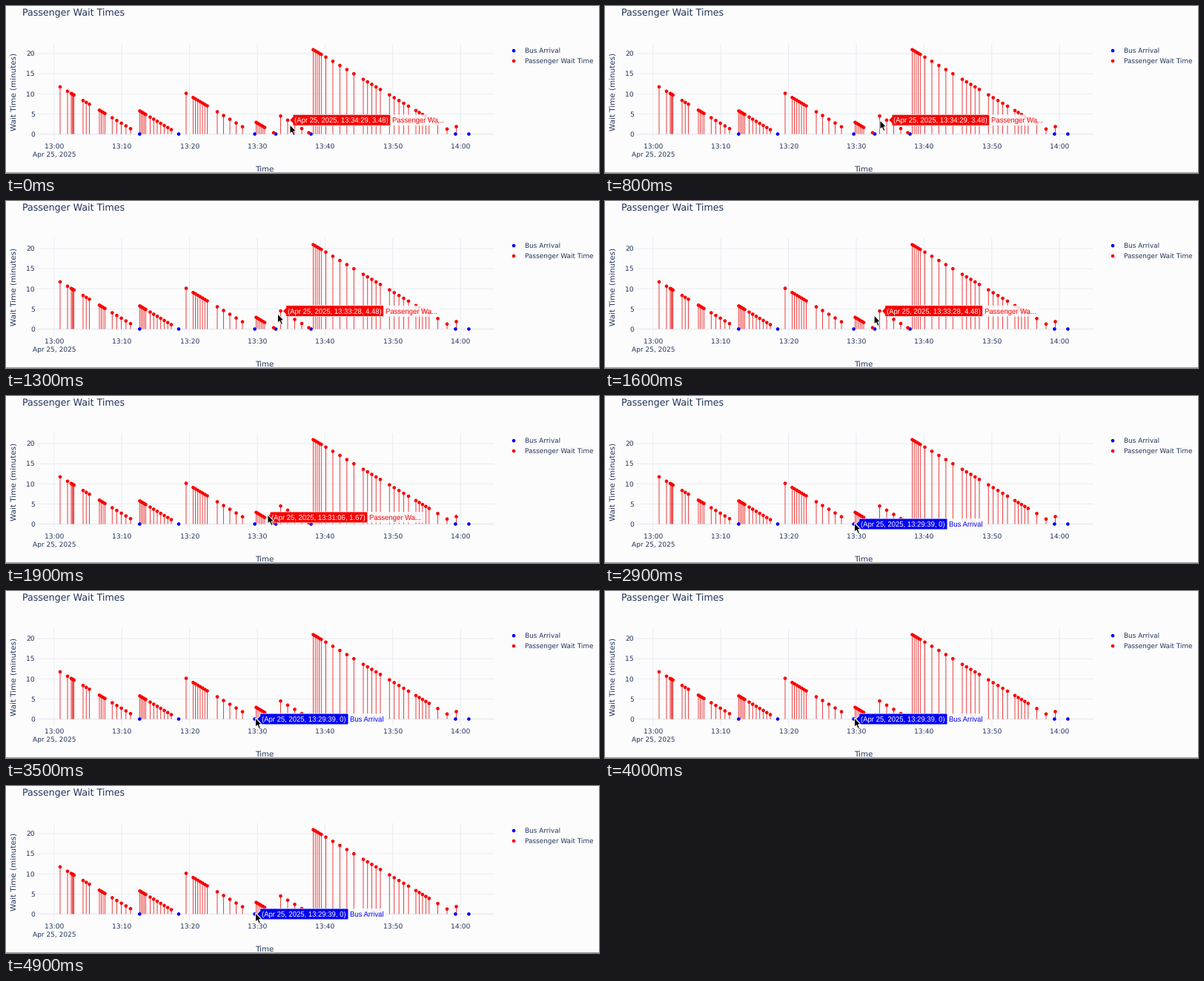
Recreate the animation shown at these times as a matplotlib script. Size 800 px wide and 225 px high, loop 5 s.

```python
import numpy as np
import matplotlib.pyplot as plt
from matplotlib.animation import FuncAnimation
from matplotlib.patches import Circle, Polygon, Rectangle

W, H, DPI = 800, 225, 100
PT = 72 / DPI  # points per pixel
INTERVAL, FRAMES = 100, 50

INK, GRID, PAPER = "#22345a", "#e9ecf2", "#fcfcfd"
RED, BLUE, STEM = "#fa0000", "#0000f5", "#e61414"

X0, PX_PER_MIN = 64.8, 9.14    # pixel of 13:00 and horizontal scale
Y0, PY_PER_MIN = 172.5, 5.415  # pixel of zero wait and vertical scale
LEFT, RIGHT, TOP, BOTTOM = 42, 659, 50, 182

plt.rcParams["text.hinting"] = "none"
plt.rcParams["path.snap"] = False

# Passengers come in evenly spaced bursts: first pixel, last pixel, count.
BURSTS = [
    (73, 83, 2), (88, 91.7, 4), (104, 112.5, 3), (126, 133.5, 4), (143.3, 168, 5),
    (180.5, 188.5, 5), (194.5, 223, 7), (243, 252.5, 2), (255.5, 271.5, 6),
    (285, 319, 5), (337.5, 349, 6), (361, 408.5, 6), (414.5, 425.3, 5),
    (431.5, 469.3, 5), (482, 505, 5), (517.3, 543, 5), (553, 570.8, 5), (582.5, 607.5, 3),
]
BUSES = np.array([180.3, 233, 335.6, 364, 411.5, 606.4, 624.4])
PASSENGERS = np.concatenate([np.linspace(*burst) for burst in BURSTS])

# A wait lasts until the next bus.
next_bus = BUSES[np.searchsorted(BUSES, PASSENGERS, side="right")]
WAIT_Y = Y0 - (next_bus - PASSENGERS) * PY_PER_MIN / PX_PER_MIN

# Start time in ms, clock, wait in minutes, series name, colour.
HOVERS = [
    (0, "13:34:29", 3.48, "Passenger Wa...", RED),
    (900, "13:33:28", 4.48, "Passenger Wa...", RED),
    (1800, "13:31:06", 1.67, "Passenger Wa...", RED),
    (2400, "13:29:39", 0, "Bus Arrival", BLUE),
]
# Cursor moves: start ms, end ms, step in x and y.
CURSOR_START = np.array([383, 160])
CURSOR_MOVES = [(500, 800, -12, -6), (800, 1000, -4.5, -2),
                (1500, 1900, -13.5, 8), (1900, 2400, -16.5, 11)]
ARROW = np.array([(0, 0), (0, 12.2), (2.7, 9.7), (4.8, 14.4),
                  (6.9, 13.5), (4.9, 8.9), (8.6, 8.8)])

fig = plt.figure(figsize=(W / DPI, H / DPI), dpi=DPI, facecolor=PAPER)
ax = fig.add_axes([0, 0, 1, 1])
ax.set(xlim=(0, W), ylim=(H, 0))
ax.axis("off")


def label(x, y, text, size=8.9, color=INK, font="DejaVu Sans", **kw):
    return ax.text(x, y, text, fontsize=size * PT, color=color, family=font, **kw)


def line(xs, ys, color, width):
    ax.plot(xs, ys, color=color, lw=width * PT, solid_capstyle="butt", zorder=1)


def dots(xs, ys, color, zorder):
    for center in zip(xs, ys):
        ax.add_patch(Circle(center, 2.3, fc=color, ec="none", zorder=zorder))


def draw_chart():
    for i in range(7):
        x = X0 + 10 * i * PX_PER_MIN
        line([x, x], [TOP, BOTTOM], GRID, 1)
        label(x + 0.2, 192, f"{13 + i // 6}:{i % 6}0", 9.15, ha="center")
    for wait in range(0, 21, 5):
        y = Y0 - wait * PY_PER_MIN
        line([LEFT, RIGHT], [y, y], GRID, 1 if wait else 1.6)
        label(39, y + 3.1, str(wait), 9.1, ha="right")
    line([0, W], [224.5, 224.5], "#999999", 1)

    ax.vlines(PASSENGERS, WAIT_Y, Y0, color=STEM, lw=0.9 * PT, alpha=0.9, zorder=2)
    dots(BUSES, np.full(len(BUSES), Y0), BLUE, 3)
    dots(PASSENGERS, WAIT_Y, RED, 4)

    label(21.5, 13, "Passenger Wait Times", 12.6)
    label(36, 203.4, "Apr 25, 2025", 9)
    label(349.1, 223, "Time", 10.4, ha="center")
    label(10.9, 115, "Wait Time (minutes)", 10.4, ha="center", va="center", rotation=90)
    for y, name, color in [(60.2, "Bus Arrival", BLUE), (74.1, "Passenger Wait Time", RED)]:
        dots([685], [y], color, 4)
        label(700, y + 3.1, name, 8.9)


def make_hover(clock, wait, name, color):
    hours, minutes, seconds = map(int, clock.split(":"))
    x = X0 + ((hours - 13) * 60 + minutes + seconds / 60) * PX_PER_MIN
    y = Y0 - wait * PY_PER_MIN
    tip, left, half = x + 2.7, x + 7.1, 7.4
    box_w, name_w = (131.7, 75) if wait else (119, 50.5)
    right = left + box_w
    shape = [(tip, y), (left, y - 4.4), (left, y - half), (right, y - half),
             (right, y + half), (left, y + half), (left, y + 4.4)]
    patches = [
        Rectangle((right, y - half), name_w, 2 * half, fc=PAPER, ec="none",
                  alpha=0.85, zorder=6),
        Polygon(shape, fc=color, ec="white", lw=0.7 * PT, zorder=7),
    ]
    for patch in patches:
        ax.add_patch(patch)
    style = dict(size=9.55, font="Liberation Sans", zorder=8)
    texts = [
        label(left + 2.2, y + 3.3, f"(Apr 25, 2025, {clock}, {wait})", color="white", **style),
        label(right + 2.2, y + 3.3, name, color=color, **style),
    ]
    return patches + texts


def cursor_tip(t):
    tip = CURSOR_START.astype(float)
    for start, end, dx, dy in CURSOR_MOVES:
        tip += np.clip((t - start) / (end - start), 0, 1) * np.array([dx, dy])
    return tip


draw_chart()
hovers = [make_hover(*hover[1:]) for hover in HOVERS]
cursor = ax.add_patch(Polygon(ARROW, fc="black", ec="white", lw=0.9 * PT, zorder=10))


def update(frame):
    t = frame * INTERVAL
    current = sum(t >= hover[0] for hover in HOVERS) - 1
    for i, parts in enumerate(hovers):
        for part in parts:
            part.set_visible(i == current)
    cursor.set_xy(ARROW + cursor_tip(t))
    return [cursor, *sum(hovers, [])]


anim = FuncAnimation(fig, update, frames=FRAMES, interval=INTERVAL,
                     repeat=True, repeat_delay=0)
plt.show()
```
